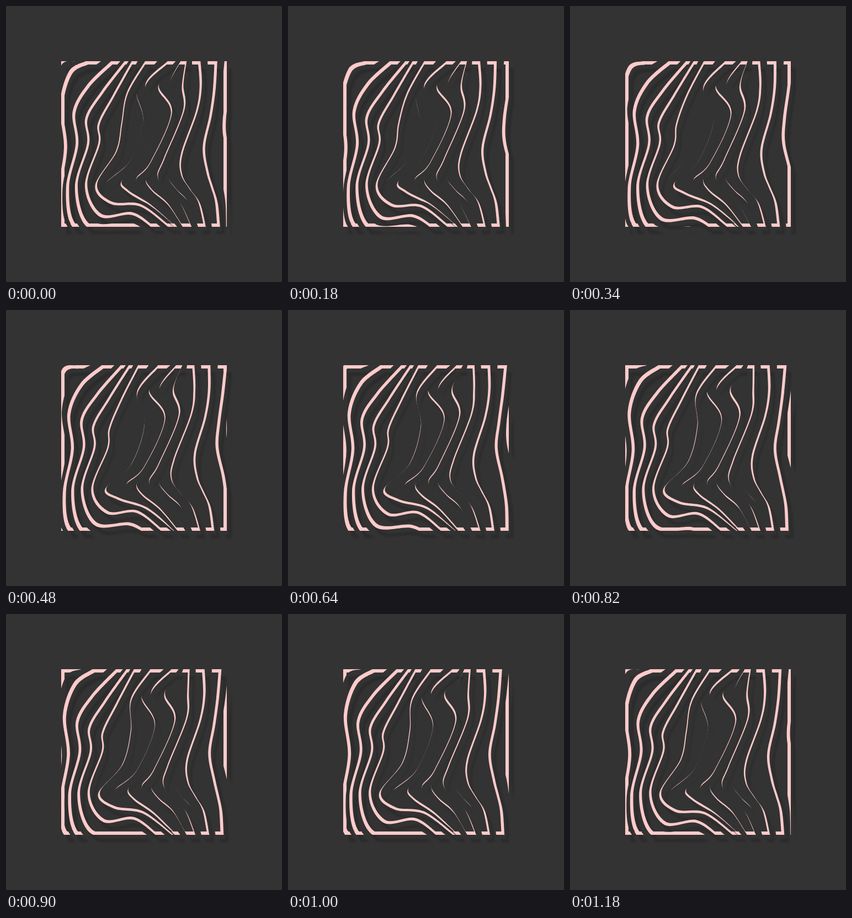
An HTML page with a canvas that plays this animation: 500 px wide and 500 px high, repeating every 1.2 s.

```html
<!DOCTYPE html>
<html lang="en">
<head>
<meta charset="utf-8">
<title>Drifting contours</title>
<style>
  html, body { margin: 0; width: 100%; height: 100%; overflow: hidden; background: #333; }
  canvas { display: block; width: 500px; height: 500px; }
</style>
</head>
<body>
<canvas id="stage" width="500" height="500"></canvas>
<script>
const LOOP = 1200, SIZE = 500, LO = 100, SIDE = 300, MID = 250;
const STRIPES = 12;
const DUTY = 0.57;   // filled share of each stripe
const INSET = 0.96;  // scale of the copy cut out of the stripes
const PINK = '#ffcbcb', BACK = '#333';

// Key curves, top to bottom; every other contour is blended from them by level
const KEYS = [
  [0.57, '125,100 100,108 87,175 96,258 88,335 85,390 86,410 88,420'],
  [2.47, '205,100 160,150 132,196 136,250 116,330 134,404 205,414 225,420'],
  [4.47, '236,100 205,161 181,214 179,249 152,326 180,372 234,369 277,400'],
  [5.47, '270,100 233,150 241,208 220,279 173,326 200,347 252,361 303,400'],
  [6.04, '294,100 254,143 284,196 246,285 211,318 222,337 262,363 304,400'],
  [8.04, '338,100 339,143 334,188 301,273 295,308 312,334 334,358 349,400'],
  [10.04, '397,100 392,150 385,202 380,250 390,300 395,328 399,358 400,400']
].map(([level, points]) => ({ level, xy: points.split(/[ ,]/).map(Number) }));

const levels = KEYS.map(key => key.level);
const slopeMean = (a, b) => a * b > 0 ? 2 * a * b / (a + b) : 0;

// Monotone spline through (xs, ys), linear beyond both ends
function spline(xs, ys) {
  const n = xs.length - 1;
  const d = i => (ys[i + 1] - ys[i]) / (xs[i + 1] - xs[i]);
  const m = xs.map((_, i) =>
    i === 0 ? d(0) : i === n ? d(n - 1) : slopeMean(d(i - 1), d(i)));
  return x => {
    if (x <= xs[0]) return ys[0] + m[0] * (x - xs[0]);
    if (x >= xs[n]) return ys[n] + m[n] * (x - xs[n]);
    let i = 0;
    while (x > xs[i + 1]) i++;
    const w = xs[i + 1] - xs[i], u = (x - xs[i]) / w, v = 1 - u;
    return ys[i] * v * v * (1 + 2 * u) + ys[i + 1] * u * u * (1 + 2 * v)
      + w * u * v * (m[i] * v - m[i + 1] * u);
  };
}

const coords = KEYS[0].xy.map((_, j) => spline(levels, KEYS.map(key => key.xy[j])));

function contour(level) {
  const points = [];
  for (let j = 0; j < coords.length; j += 2) {
    points.push([coords[j](level), coords[j + 1](level)]);
  }
  return points;
}

// Smooth curve through the points, joined to the current path
function trace(path, points) {
  const at = i => points[Math.min(Math.max(i, 0), points.length - 1)];
  const handle = (i, sign) =>
    at(i).map((c, axis) => c + sign * (at(i + 1)[axis] - at(i - 1)[axis]) / 6);
  path.lineTo(...at(0));
  for (let i = 1; i < points.length; i++) {
    path.bezierCurveTo(...handle(i - 1, 1), ...handle(i, -1), ...at(i));
  }
}

function stripes(phase) {
  const all = new Path2D();
  for (let k = 0; k < STRIPES; k++) {
    const stripe = new Path2D();
    trace(stripe, contour(k - phase));
    trace(stripe, contour(k - phase + DUTY).reverse());
    stripe.closePath();
    all.addPath(stripe);
  }
  return all;
}

const ctx = document.getElementById('stage').getContext('2d');
const layer = document.createElement('canvas');
layer.width = layer.height = SIZE;
const ink = layer.getContext('2d');
ink.fillStyle = PINK;

function fillScaled(path, scale, mode) {
  ink.save();
  ink.globalCompositeOperation = mode;
  ink.translate(MID, MID);
  ink.scale(scale, scale);
  ink.translate(-MID, -MID);
  ink.beginPath();
  ink.rect(LO, LO, SIDE, SIDE);
  ink.clip();
  ink.fill(path);
  ink.restore();
}

function draw(time) {
  const path = stripes(time % LOOP / LOOP);
  ink.clearRect(0, 0, SIZE, SIZE);
  fillScaled(path, 1, 'source-over');
  fillScaled(path, INSET, 'destination-out');

  ctx.shadowColor = 'transparent';
  ctx.fillStyle = BACK;
  ctx.fillRect(0, 0, SIZE, SIZE);
  ctx.shadowColor = 'rgba(0, 0, 0, 0.15)';
  ctx.shadowOffsetX = 9;
  ctx.shadowOffsetY = 13;
  ctx.shadowBlur = 3;
  ctx.drawImage(layer, 0, 0);
}

const start = performance.now();
function tick(now) {
  draw(Math.max(0, now - start));
  requestAnimationFrame(tick);
}
draw(0);
requestAnimationFrame(tick);
</script>
</body>
</html>
```
